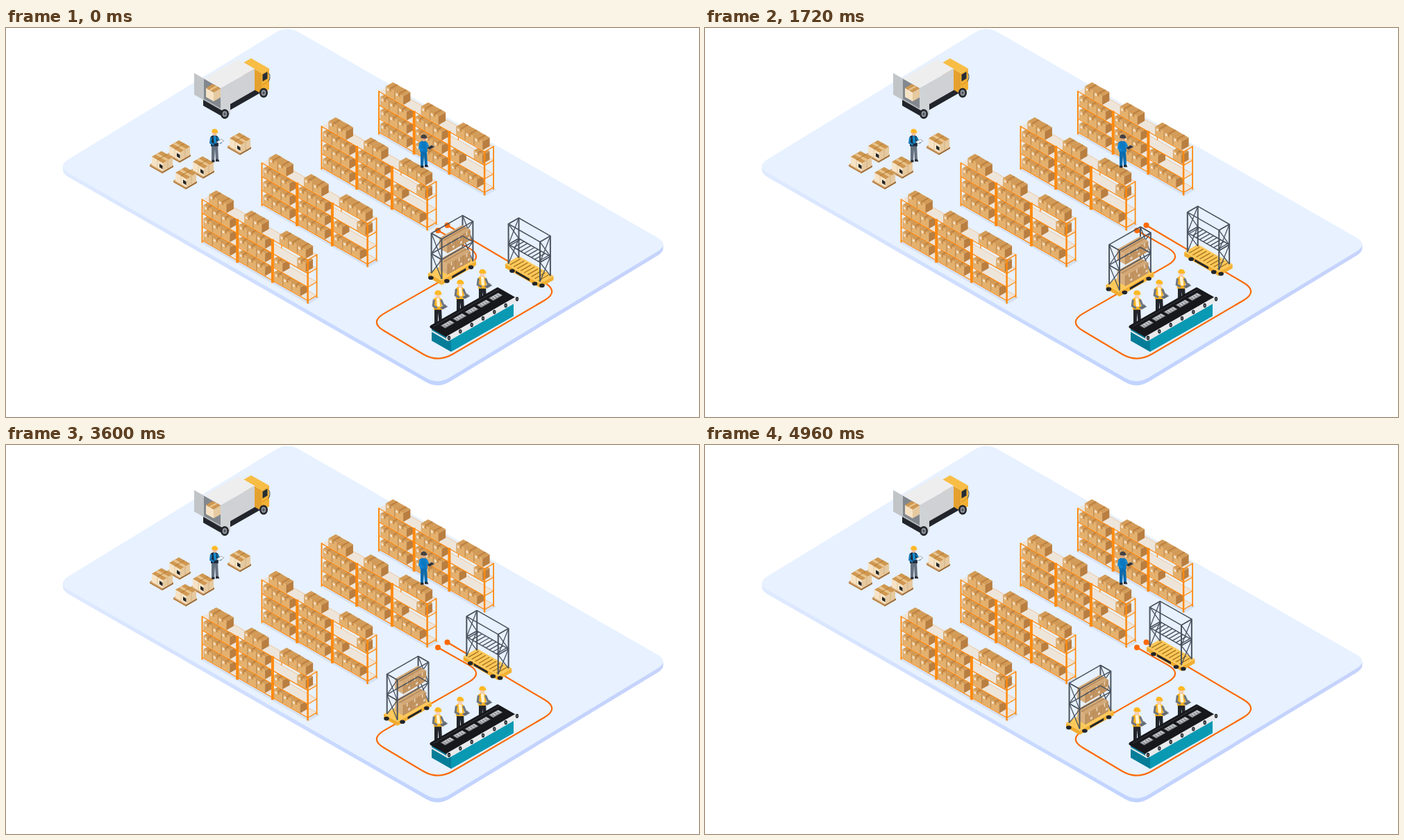
Animation, 998 px wide and 561 px high, one loop 5 s. Source, as an HTML page:

```html
<!DOCTYPE html>
<html lang="en">
<head>
<meta charset="utf-8">
<title>Warehouse floor</title>
<style>
html, body { margin: 0; width: 100%; height: 100%; overflow: hidden; background: #fff; }
svg { display: block; width: 100%; height: 100%; }
</style>
</head>
<body>
<svg id="stage" viewBox="0 0 998 561" preserveAspectRatio="none"></svg>
<script>
const K = 0.572;
const CARTON = ['#e3b06e', '#b97e40', '#d39b56'];
const CRATE = ['#f6e3c6', '#e6c99f', '#cf9750'];
const CARGO = ['#d9b07f', '#c19360', '#d2a877'];
const WOOD = ['#b98145', '#9c6a35', '#d8a566'];
const AMBER = ['#f0ac2c', '#f2b134', '#fdc95a'];
const TRAILER = ['#82888e', '#cfd1d5', '#eeeeef'];
const TEAL = ['#057d98', '#0999b3', '#0999b3'];
const DARK = '#22252b', STEEL = '#4a525d', RACK = '#ff8a0f', ORANGE = '#fb6a05';

// Drawing helpers
const r = n => Math.round(n * 10) / 10;
const xy = p => p.map(r).join(' ');
const loop = (n, f) => [...Array(n).keys()].map(f).join('');
const path = (d, fill, extra = '') => `<path d="${d}" fill="${fill}" ${extra}/>`;
const stroke = (d, color, w, cap = 'butt') =>
  path(d, 'none', `stroke="${color}" stroke-width="${w}" stroke-linecap="${cap}"`);
const poly = (pts, fill, extra) => path('M' + pts.map(xy).join('L') + 'Z', fill, extra);
const line = (a, b, color, w = 1, cap) => stroke(`M${xy(a)}L${xy(b)}`, color, w, cap);
const oval = ([x, y], rx, ry, fill) =>
  `<ellipse cx="${r(x)}" cy="${r(y)}" rx="${rx}" ry="${ry}" fill="${fill}"/>`;
const group = (transform, s) => `<g transform="${transform}">${s}</g>`;

// Point at a distance d from a on the way to b
function toward(a, b, d) {
  const f = d / Math.hypot(b[0] - a[0], b[1] - a[1]);
  return a.map((v, n) => v + (b[n] - v) * f);
}
const bend = (prev, c, next, d) => `${xy(toward(c, prev, d))}Q${xy(c)} ${xy(toward(c, next, d))}`;

// Isometric axes: i runs down-right, j runs up-right, k is height.
const iso = (x, y) => (i, j, k = 0) => [x + i + j, y + (i - j) * K - k];
const leftFace = (p, j, i, a, k, h, fill) =>
  poly([p(i, j, k), p(i + a, j, k), p(i + a, j, k + h), p(i, j, k + h)], fill);
const rightFace = (p, i, j, b, k, h, fill) =>
  poly([p(i, j, k), p(i, j + b, k), p(i, j + b, k + h), p(i, j, k + h)], fill);
const flat = (p, k, i, a, j, b, fill, extra) =>
  poly([p(i, j, k), p(i + a, j, k), p(i + a, j + b, k), p(i, j + b, k)], fill, extra);
const block = (p, a, b, h, [left, right, top]) =>
  leftFace(p, 0, 0, a, 0, h, left) + rightFace(p, a, 0, b, 0, h, right) + flat(p, h, 0, a, 0, b, top);

function floor() {
  const c = [[73.5, 199.5], [405, -3.5], [955, 312], [622, 514.5]];
  const d = 'M' + c.map((q, n) => bend(c[(n + 3) % 4], q, c[(n + 1) % 4], 20)).join('L') + 'Z';
  return `<defs><linearGradient id="rim"><stop stop-color="#dfeaff"/>
    <stop offset=".6" stop-color="#c1d3ff"/><stop offset="1" stop-color="#c6d3fb"/></linearGradient></defs>` +
    loop(4, n => group(`translate(0 ${6 - n * 1.5})`, path(d, 'url(#rim)'))) + path(d, '#e7f1ff');
}

function track() {
  const c = [[622, 292], [688, 329.5], [523, 424], [622, 483], [797, 380], [635.5, 284.5]];
  const bends = c.slice(1, -1).map((q, n) => bend(c[n], q, c[n + 2], 25));
  return stroke('M' + [xy(c[0]), ...bends, xy(c[5])].join('L'), ORANGE, 2.2) +
    oval(c[0], 4, 4, ORANGE) + oval(c[5], 4, 4, ORANGE);
}

function carton(x, y) {
  const p = iso(x, y), a = 12.3, b = 10, h = 12.5;
  return block(p, a, b, h, CARTON) + flat(p, h, 5, 2.4, 0, b, '#bd8345') +
    leftFace(p, 0, 5, 2.4, h - 4, 4, '#c58a48') + leftFace(p, 0, 1.2, 2.8, h - 5, 3, '#f3e6d5') +
    line(p(a, 0), p(a, 0, h), '#a9713a', .5) + line(p(0, 0), p(0, 0, h), '#c4904f', .5);
}

// Row of cartons on a level (0 is the top); the last bay is half empty.
function row(p, bay, level) {
  const sparse = bay === 2, middle = level === 1 || level === 2;
  const count = sparse && middle ? 1 : sparse || level ? 3 : 2;
  const first = level === 0 ? 9.5 : sparse && level === 1 ? 35 : 1.5;
  return loop(count, n => carton(...p(first + n * 12.8, .8)));
}

function rack(x) {
  const y = 247.5 - (x - 282.5) * .613, w = 50.7, d = 13, step = 19.6;
  const p = iso(x, y), end = 3 * w;
  let s = flat(p, -62, -1, end + 3, -1, d + 3, '#d5e1f3');
  for (let bay = 0; bay < 3; bay++) {
    const i = bay * w;
    s += line(p(i, d, 0), p(i, d, -60), RACK, 1.3);
    for (let level = 3; level >= 0; level--) {
      const q = iso(...p(i, 0, -level * step));
      s += flat(q, 0, 0, w, 0, d, '#eee5da') + line(q(0, d), q(w, d), '#f4b777', .7) +
        row(q, bay, level) + line(q(0, 0), q(w, 0), RACK, 1.3);
    }
    s += line(p(i, 0, 1), p(i, 0, -62), RACK, bay ? 4 : 2);
  }
  return s + loop(4, n => line(p(end, 0, -n * step), p(end, d, -n * step), RACK, 1.3)) +
    line(p(end, d, 1), p(end, d, -62), RACK, 1.8) + line(p(end, 0, 1), p(end, 0, -63), RACK, 2.5);
}

function pallet(x, y) {
  const p = iso(x + 3, y + 20), a = 16, b = 14, h = 12;
  return block(iso(x, y + 22), 18, 16, 2.5, WOOD) + block(p, a, b, h, CRATE) +
    flat(p, h, 0, a, 5, 3.5, '#e9c38c') +
    line(p(a / 2, 0, h), p(a / 2, b, h), '#b37a37') +
    line(p(a / 2, 0, h), p(a / 2, 0), '#dfc193', .8) +
    line(p(a, b / 2, h), p(a, b / 2), '#cfab79', .8) +
    leftFace(p, 0, 11, 4.5, 3, 5, '#252525');
}

function truck() {
  const p = iso(285, 104), c = iso(342, 80);
  const wheel = q => oval(q, 6, 7, DARK) + oval(q, 3.4, 4.2, '#8d9297') + oval(q, 1.5, 2, STEEL);
  return block(iso(284, 112), 25, 70, 9, [DARK, DARK, DARK]) +
    block(c, 26, 11, 30, ['#e5a12d', '#f3b134', '#f8bd45']) +
    rightFace(c, 26, 1.5, 7, 17, 10, '#272d36') + line(c(26, 1, 12), c(26, 10, 12), '#d49427') +
    stroke('M378 65q3 2 1.5 9l-1.5 3', STEEL, 1) + wheel([371, 93.5]) +
    block(p, 24, 49, 31, TRAILER) +
    block(iso(288, 99.5), 11, 10, 13, CRATE) + line([293.5, 89.5], [303.5, 84], '#eac58d', 2) +
    leftFace(p, 0, 0, 24, 0, 2, '#b3b7ba') +
    leftFace(p, 0, -14, 14, 0, 31, '#c1c5c8') + leftFace(p, 0, 24, 14, 0, 31, '#d0d3d6') +
    wheel([315, 124]);
}

// Person whose head is centred on (x, y)
function person(x, y, { top, arm, legs, skin = '#f3bd98', hat = '#fdb823', vest, size = 1 }) {
  return group(`translate(${x} ${y}) scale(${size})`,
    path('M-4.500 16h9l1 23h-4l-1-16-1 17h-4Z', legs) +
    path('M-4 39h4v3h-4.500ZM1.500 38h4l1.500 3h-5.500Z', DARK) +
    path('M-5.500 5q5-4 10 0l1 14h-11Z', top) +
    (vest ? path('M-2 4h4l1 11h-4Z', vest) : '') +
    stroke('M-5 6l-1 8 5 3M4 6l3 7 3 1', arm, 2.8) +
    oval([0, 0], 3.2, 4, skin) + path('M-4.300-1q0-5 4.300-5t5 5.500q-4 1-9.300-.5Z', hat));
}
const tablet = (x, y, fill) => flat(iso(x, y), 0, 0, 4, 0, 7, fill, 'stroke="#78818c" stroke-width=".6"');

function packer(n) {
  const x = 622 + n * 32, y = 385 - n * 15.3;
  return person(x, y, { top: '#fbb421', arm: '#707780', legs: DARK, vest: '#fff3d6', skin: '#f6cfb3', size: 1.12 }) +
    tablet(x + 3, y + 18.5, '#636972');
}

function conveyor() {
  const p = iso(610, 431.5), a = 26, b = 98;
  const edge = n => p(a + 1, 1 + n * b, -.5);
  return block(iso(613, 451), 28, 90, 20, TEAL) +
    line(p(0, 1, -5), p(a, 1, -5), '#ececed', 2) +
    flat(p, 0, 1, a - 2, 2, b - 3, '#17181c', 'stroke="#17181c" stroke-width="5" stroke-linejoin="round"') +
    line(p(2, 4), p(2, b), '#393b40') +
    line(edge(0), edge(1), '#e8eaec', 7.5, 'round') +
    loop(7, n => oval(edge(n / 6), 2.2, 3.1, DARK) + oval(edge(n / 6), .9, 1.5, '#777f88')) +
    loop(5, n => {
      const j = 10 + n * 17.3;
      return flat(p, 0, 6, 6.5, j, 13.5, '#8a8e93') + flat(p, .5, 7, 4.5, j + 1, 11.5, '#c1c4c8') +
        loop(3, m => line(p(7.5, j + 3 + m * 3.5), p(11, j + 3 + m * 3.5), '#555a61', .9));
    });
}

// Wheeled frame; its crossed braces close the two short ends.
function cart(x, y, a, b, loaded) {
  const p = iso(x, y), base = 6, high = 63.5, half = 34, d = 2.3;
  const left = [d, d], back = [d, b - d], right = [a - d, b - d], front = [a - d, d];
  const bar = (c, k, e, l, w = 1.5) => line(p(...c, k), p(...e, l), STEEL, w);
  const post = c => bar(c, base, c, high + .5, 2);
  const ring = k => bar(left, k, back, k) + bar(back, k, right, k) + bar(right, k, front, k) + bar(front, k, left, k);
  const gate = (c, e) => [[base, half], [half, high]].map(([k, l]) =>
    bar(c, k, e, l, 1.3) + bar(c, l, e, k, 1.3) + bar(c, l, e, l, 1.3)).join('');
  const wheel = (i, j) => oval(p(i, j, 1.5), 3.8, 2.8, DARK);
  const slats = (k, color) => loop(9, n => {
    const i = d + (n + .5) * (a - 2 * d) / 9;
    return line(p(i, d, k), p(i, b - d, k), color, 1.4);
  });

  let s = block(p, a, b, base, AMBER) + wheel(a * .2, 0) + wheel(a, b * .15) +
    (loaded ? wheel(a, b * .85) : wheel(a * .85, 0)) +
    (loaded ? rightFace(p, a, b * .3, b * .4, 1, 3.5, DARK) : leftFace(p, 0, a * .3, a * .4, 1, 3.5, DARK)) +
    (loaded ? '' : slats(base, '#a87620')) +
    post(back) + (loaded ? gate(back, right) : gate(left, back));
  if (loaded) {
    for (const k of [base, base + 31]) s += loop(3, n => cargo(...p(4, 34 - n * 11, k)));
  } else {
    s += slats(half, STEEL);
  }
  return s + ring(half) + (loaded ? gate(left, front) : gate(front, right)) +
    post(left) + post(right) + post(front) + ring(high);
}

function cargo(x, y) {
  const p = iso(x, y), a = 12, b = 11, h = 15;
  return block(p, a, b, h, CARGO) + line(p(a / 2, 0, h), p(a / 2, b, h), '#b4885a', 1.5) +
    line(p(a, b / 2, h), p(a, b / 2, h - 5), '#ead5b9', 1.5) +
    line(p(a, 0), p(a, 0, h), '#a77c4e', .7) + rightFace(p, a, 7, 3, 3, 3, '#e6d3bb');
}

const pallets = loop(4, n => {
  const near = n >> 1, side = 1 - n % 2;
  return pallet(207 + 34 * near + 25 * side, 177.5 + 23 * near - 15.5 * side);
}) + pallet(319, 151);

document.getElementById('stage').innerHTML = floor() + truck() + pallets +
  person(300.5, 151.5, { top: '#1c2738', vest: '#1688c9', arm: '#1779b5', legs: '#66717f' }) +
  tablet(303, 164.5, '#f7f8fa') +
  [537, 454.5, 368.5, 282.5].map(rack).join('') +
  person(601.5, 159.5, { top: '#0a79c2', arm: '#1486d2', legs: '#096cb0', skin: '#dca681', hat: '#454143' }) +
  tablet(606, 173, '#2b3038') + track() +
  `<g id="empty">${cart(719, 346, 50, 19.5, false)}</g>` +
  `<g id="loaded">${cart(608, 359.5, 19.5, 49.5, true)}</g>` +
  loop(3, n => packer(2 - n)) + conveyor();

const empty = document.getElementById('empty'), loaded = document.getElementById('loaded');
const move = (el, x, y) => el.setAttribute('transform', `translate(${x.toFixed(2)} ${y.toFixed(2)})`);

function draw(now) {
  const t = Math.floor(now % 5000 / 40) * .04;
  move(loaded, -17.75 * t, 9.55 * t);
  move(empty, -16.74 * t, -9.82 * t);
}

const start = performance.now();
function tick() {
  draw(performance.now() - start);
  requestAnimationFrame(tick);
}
tick();
</script>
</body>
</html>
```
